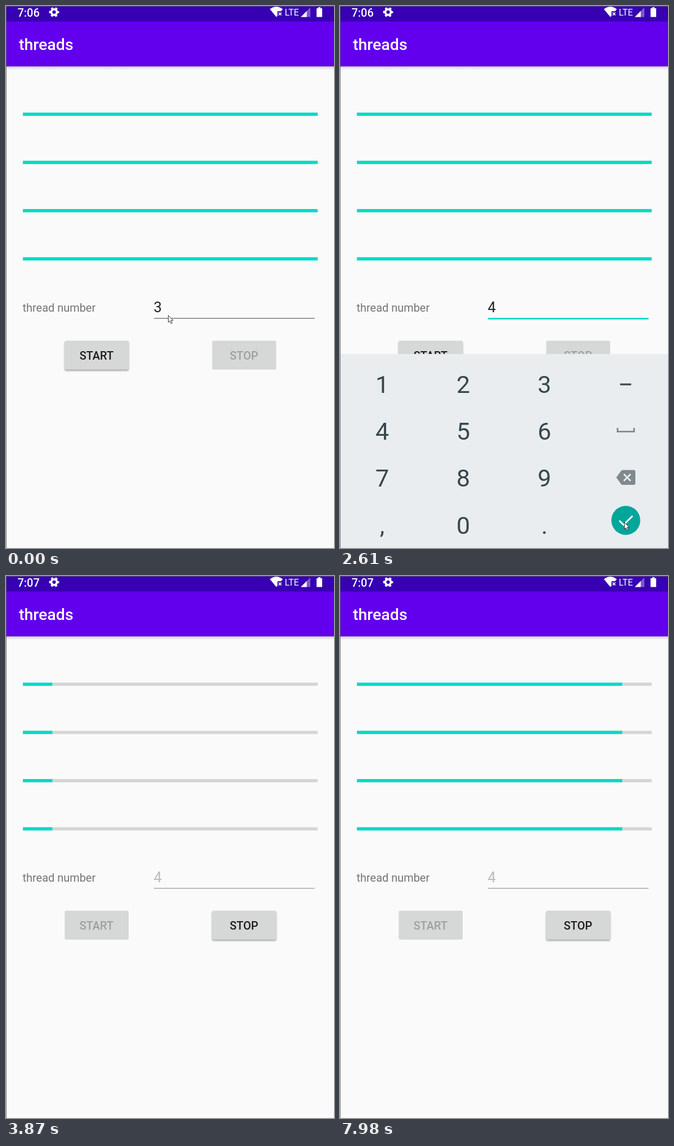
Recreate the animation shown at these times as an HTML page. Size 583 by 961 pixels, loop 8 s.

```html
<!DOCTYPE html>
<html lang="en">
<head>
<meta charset="utf-8">
<title>threads</title>
<style>
  html, body { margin: 0; width: 100%; height: 100%; overflow: hidden; background: #fafafa; }
  svg { display: block; width: 100vw; height: 100vh; font-family: Roboto, sans-serif; }
  .medium { font-weight: 500; }
  .center { text-anchor: middle; }
  .button { font-size: 19.95px; fill: rgba(0, 0, 0, .87); }
  .button rect { fill: #d6d7d7; }
  .raised rect { filter: drop-shadow(0 2px 1.4px rgba(0, 0, 0, .36)); }
  .disabled { fill: rgba(0, 0, 0, .26); }
  .pressed rect { fill: #bcbcbc; }
  .key { font-size: 43px; fill: #37474f; }
</style>
</head>
<body>
<svg viewBox="0 0 583 961" preserveAspectRatio="none">
  <defs>
    <linearGradient id="barShadow" x2="0" y2="1">
      <stop stop-opacity=".28"/>
      <stop offset=".4" stop-opacity=".1"/>
      <stop offset="1" stop-opacity="0"/>
    </linearGradient>
  </defs>
  <rect width="583" height="961" fill="#fafafa"/>

  <!-- status bar and title -->
  <rect y="106.5" width="583" height="7" fill="url(#barShadow)"/>
  <rect width="583" height="107" fill="#6200ee"/>
  <rect width="583" height="27.5" fill="#3700b3"/>
  <g fill="#fff">
    <text id="clock" class="medium" x="20.5" y="18.5" font-size="19.95"></text>
    <g fill="none" stroke="#fff">
      <circle cx="85.5" cy="10.8" r="5" stroke-width="3.8"/>
      <circle cx="85.5" cy="10.8" r="7.5" stroke-width="2.8" stroke-dasharray="3.9 3.954" stroke-dashoffset="1.95"/>
    </g>
    <path d="M469 5.5Q480.5 -3 492 5.5L489 9.3H482.5V17.2L480.5 19.5Z"/>
    <path d="M484.5 11.5l5 5m0-5l-5 5" stroke="#fff" stroke-width="1.7"/>
    <text x="495.5" y="16.5" font-size="16">LTE</text>
    <path d="M524 19.5L541 2.5V19.5Z" opacity=".35"/>
    <path d="M524 19.5L534.5 9V19.5Z"/>
    <path d="M552 4h3v-2h4v2h3v15.5h-10z"/>
    <text class="medium" x="23" y="78" font-size="28.5">threads</text>
  </g>

  <g id="bars"></g>

  <!-- form -->
  <text x="29.5" y="542" font-size="19.95" fill="#757575">thread number</text>
  <text id="field" x="262.6" y="543" font-size="25.65"></text>
  <rect id="underline" x="263" width="285.5"/>
  <rect id="caret" y="516" width="2.4" height="36" fill="#03dac5"/>
  <path id="handle" d="M277.5 551.5L287.5 560.2A14 14 0 1 1 267.5 560.2Z" fill="#03dac5"/>
  <g id="start" class="button">
    <rect x="104.3" y="593.5" width="113.7" height="51.3" rx="2.8"/>
    <text class="medium center" x="161" y="627">START</text>
  </g>
  <g id="stop" class="button">
    <rect x="366.5" y="593.5" width="113.7" height="51.3" rx="2.8"/>
    <text class="medium center" x="423" y="627">STOP</text>
  </g>

  <g id="keyboard">
    <rect y="617" width="583" height="364" fill="#e9edf0"/>
    <g id="keys" class="key center"></g>
    <rect x="498" y="669.3" width="19.5" height="3.2" fill="#37474f"/>
    <path d="M493.3 748v6.6h29.4V748" fill="none" stroke="#80898e" stroke-width="2.8"/>
    <path d="M491 836l8.5-11.6q1.2-1.6 3-1.6h19.5q3 0 3 3v20.2q0 3-3 3h-19.5q-1.8 0-3-1.6z" fill="#80898e"/>
    <path d="M504.5 830l12 12m0-12l-12 12" stroke="#e9edf0" stroke-width="2.8"/>
    <circle id="done" cx="508" cy="912"/>
    <path d="M496.5 912.5l7.5 7.5l16-16" fill="none" stroke="#fff" stroke-width="2.9"/>
  </g>

  <path id="pointer" d="M.5 .5V12.8L3.2 10.2L5.2 15L7.4 14L5.4 9.4H9Z" fill="#fff" stroke="#222" stroke-width=".9"/>
  <path d="M.5 0V961M0 .5H583" stroke="#666" stroke-opacity=".8" fill="none"/>
</svg>
<script>
const LOOP = 8000;
const el = id => document.getElementById(id);
const set = (node, attrs) => {
  for (const name in attrs) node.setAttribute(name, attrs[name]);
  return node;
};
const add = (parent, tag, attrs) =>
  set(parent.appendChild(document.createElementNS('http://www.w3.org/2000/svg', tag)), attrs);
const show = (id, visible) => set(el(id), { visibility: visible ? 'visible' : 'hidden' });

// Last step whose start time has passed; each step is [time, ...values].
const stepAt = (steps, t) => steps.findLast(step => step[0] <= t);
const within = (t, spans) => spans.some(([from, to]) => t >= from && t < to);

[...'123456789,0.'].forEach((label, i) => {
  const key = add(el('keys'), 'text', { x: 75 + i % 3 * 144.2, y: 685.5 + Math.floor(i / 3) * 83.4 });
  key.textContent = label;
});

const fills = [0, 1, 2, 3].map(i => {
  const box = { x: 30, y: 189 + 85.5 * i, width: 524, height: 5.7 };
  add(el('bars'), 'rect', { ...box, fill: '#d5d5d5' });
  return add(el('bars'), 'rect', { ...box, fill: '#03dac5' });
});

const RUN = 3480;
const TICKS = [3870, 4430, 5020, 5420, 5880, 6440, 6970, 7400, 7830];
const CARET_ON = [[240, 750], [1200, 1830], [1950, 2460], [3030, RUN]];
const KEYBOARD = [[0, 0, 0], [240, 20, .3], [360, 7, .75], [510, 0, 1], [2760, 20, .5], [2880, 0, 0]];
const POINTER = [
  [0, 288, 548], [510, 312, 566], [630, 420, 650], [750, 517, 729],
  [900, 539, 880], [1050, 539, 857], [1200, 509, 838], [1440, 400, 812],
  [1560, 220, 768], [1680, 75, 741], [1950, 91, 741], [2100, 190, 790],
  [2220, 340, 860], [2340, 460, 905], [2460, 505, 915], [2760, 430, 850],
  [2880, 268, 708], [3030, 217, 664], [3180, 191, 639], [3330, 186, 632]
];

function draw(t) {
  const running = t >= RUN;
  const focused = t >= 120 && !running;
  const empty = t >= 1320 && t < 1950;

  el('clock').textContent = running ? '7:07' : '7:06';

  const ticks = TICKS.filter(time => time <= t).length;
  fills.forEach((fill, i) => {
    const lagging = i === 1 && t >= 7830 && t < 7980;
    set(fill, { width: 524 * (running ? (ticks - lagging) / 10 : 1) });
  });

  el('field').textContent = empty ? 'thread number' : t < 1320 ? '3' : '4';
  set(el('field'), { 'fill-opacity': running ? .26 : empty ? .38 : .87 });
  set(el('underline'), focused
    ? { y: 552.9, height: 2.8, fill: '#03dac5' }
    : { y: 553, height: 1.4, fill: running ? '#a4a4a4' : '#747474' });
  set(el('caret'), { x: empty ? 262.8 : 276.6 });
  show('caret', within(t, CARET_ON));
  show('handle', t >= 240 && t < 1440);

  const pressed = t >= 3330 && t < 3600;
  el('start').setAttribute('class', `button ${running ? 'disabled' : 'raised'} ${pressed ? 'pressed' : ''}`);
  el('stop').setAttribute('class', `button ${running ? 'raised' : 'disabled'}`);

  const [, drop, opacity] = stepAt(KEYBOARD, t);
  set(el('keyboard'), { transform: `translate(0 ${drop})`, opacity });
  set(el('done'), t >= 2610 ? { r: 25.7, fill: '#00a69a' } : { r: 24.8, fill: '#4db6ac' });

  const [, x, y] = stepAt(POINTER, t);
  set(el('pointer'), { transform: `translate(${x} ${y})` });
  show('pointer', !running);
}

const origin = performance.now();
function frame() {
  draw((performance.now() - origin) % LOOP);
  requestAnimationFrame(frame);
}
frame();
</script>
</body>
</html>
```
